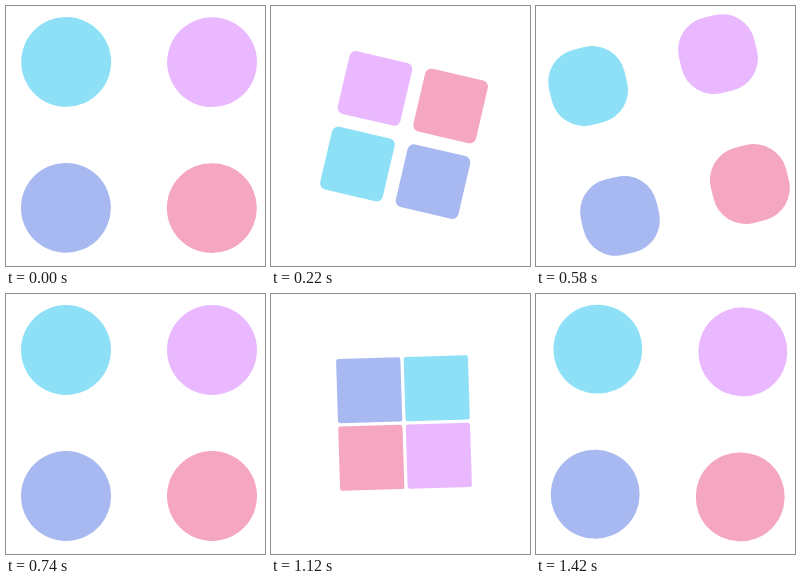
An HTML page that plays this animation: 259x260 px, repeating every 1440 ms.

```html
<!DOCTYPE html>
<html lang="en">
<head>
<meta charset="utf-8">
<title>Four shapes loader</title>
<style>
  html, body { margin: 0; width: 100%; height: 100%; overflow: hidden; background: #fff; }
  svg { display: block; width: 100%; height: 100%; }
</style>
</head>
<body>
<svg viewBox="0 0 259 260">
  <g id="group">
    <rect fill="#8de0f6"/>
    <rect fill="#eab8ff"/>
    <rect fill="#a7b9f0"/>
    <rect fill="#f5a6c1"/>
  </g>
</svg>
<script>
  const LOOP = 1440, STEP = 20, SEGMENT = 363.5, DELAY = 17;
  const group = document.getElementById("group");
  const shapes = [...group.children];
  const mix = (a, b, p) => a + (b - a) * p;

  // cubic-bezier(.25, .1, .25, 1), solved by bisection
  function ease(x) {
    let lo = 0, hi = 1;
    for (let i = 0; i < 24; i++) {
      const s = (lo + hi) / 2;
      if (0.75 * s * (1 - s) + s ** 3 < x) lo = s; else hi = s;
    }
    const s = lo;
    return 0.3 * s * (1 - s) ** 2 + 3 * s * s * (1 - s) + s ** 3;
  }

  function draw(time) {
    const t = Math.floor((time % LOOP) / STEP) * STEP;
    const phase = ((t - DELAY) / SEGMENT + 4) % 4;
    const leg = Math.floor(phase);
    const eased = ease(phase - leg);
    const p = leg % 2 ? 1 - eased : eased;   // 0: spread circles, 1: packed squares
    const angle = (leg < 2 ? -90 : 90) * p;
    const offset = mix(73, 33, p);
    const size = mix(64.3, 90, (1 - p) ** 4);
    const radius = size * mix(0.5, 0.03, p);

    group.setAttribute("transform", `translate(133 129) rotate(${angle})`);
    shapes.forEach((shape, i) => {
      const attrs = {
        x: (i % 2 ? offset : -offset) - size / 2,
        y: (i > 1 ? offset : -offset) - size / 2,
        width: size, height: size, rx: radius
      };
      for (const name in attrs) shape.setAttribute(name, attrs[name]);
    });
  }

  const start = performance.now();
  function tick() {
    draw(performance.now() - start);
    requestAnimationFrame(tick);
  }
  tick();
</script>
</body>
</html>
```
